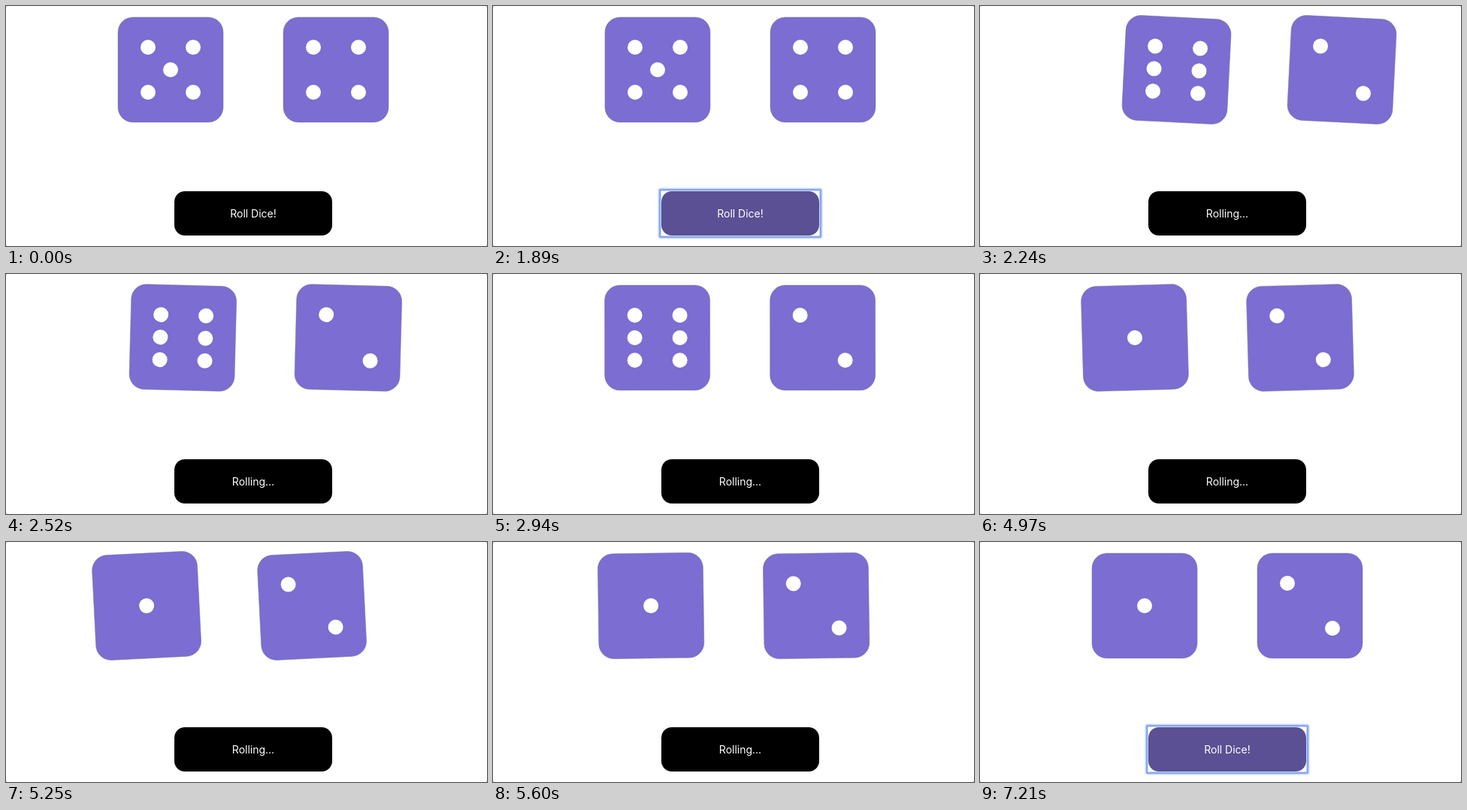
Recreate the animation shown at these times as an HTML page. Size 640 by 320 pixels, loop 7280 ms.

```html
<!DOCTYPE html>
<html lang="en">
<head>
<meta charset="utf-8">
<title>Roll Dice</title>
<style>
  html, body { margin: 0; width: 100%; height: 100%; overflow: hidden; background: #999; }
  svg { display: block; width: 640px; height: 320px; }
  text { font: 14px Inter, sans-serif; fill: #fff; text-anchor: middle; }
  .face { fill: #7b6dd1; stroke: #777099; stroke-width: .5; }
  .ring { fill: none; stroke: #86a8ee; }
</style>
</head>
<body>
<svg viewBox="0 0 640 320">
  <rect width="640" height="320" rx="2" fill="#fff"/>
  <g id="dice"></g>
  <rect id="button" x="224" y="247" width="210" height="59" rx="14"/>
  <g id="focus" class="ring">
    <rect x="221.5" y="244.5" width="215" height="64" rx="1.5" stroke-width="5" opacity=".25"/>
    <rect x="222" y="245" width="214" height="63" rx="1" stroke-width="2.6"/>
  </g>
  <text id="label" x="329" y="282"></text>
</svg>
<script>
const LOOP = 7280, STEP = 70, WOBBLE = 1050;
const CENTERS = [219, 439], CENTER_Y = 85;

// Each roll: pointer enters, button pressed, label changes, wobble starts, label returns.
const ROLLS = [
  { hover: 1120, press: 1890, roll: 1960, start: 1950, done: 3010, values: [6, 2] },
  { hover: 3920, press: 4690, roll: 4760, start: 4772, done: 5880, values: [1, 2] },
  { hover: 6440, press: 7210, roll: Infinity }
];
const FIRST_VALUES = [5, 4];

// Wobble poses at every 15 % of the duration: [shift in px, angle in degrees].
const POSES = [[0, 0], [-55, -5], [44, 3], [-33, -3], [22, 2], [-11, -1], [0, 0]];

const PIPS = {
  1: [[0, 0]],
  2: [[-1, -1], [1, 1]],
  4: [[-1, -1], [1, -1], [-1, 1], [1, 1]],
  5: [[-1, -1], [1, -1], [0, 0], [-1, 1], [1, 1]],
  6: [[-1, -1], [1, -1], [-1, 0], [1, 0], [-1, 1], [1, 1]]
};

const byId = id => document.getElementById(id);
const dice = byId('dice'), button = byId('button'), focusRing = byId('focus'), label = byId('label');

const bezier = (u, a, b) => 3 * u * (1 - u) ** 2 * a + 3 * u * u * (1 - u) * b + u ** 3;

// The CSS "ease" curve, cubic-bezier(.25, .1, .25, 1).
function ease(x) {
  let low = 0, high = 1;
  for (let i = 0; i < 24; i++) {
    const mid = (low + high) / 2;
    if (bezier(mid, .25, .25) < x) low = mid; else high = mid;
  }
  return bezier(low, .1, 1);
}

function wobble(progress) {
  if (progress <= 0 || progress >= 1) return [0, 0];
  const i = Math.min(5, Math.floor(progress / .15));
  const span = i < 5 ? .15 : .25;
  const k = ease((progress - i * .15) / span);
  return POSES[i].map((from, axis) => from + (POSES[i + 1][axis] - from) * k);
}

function die(value, centerX, [shift, angle]) {
  const pips = PIPS[value].map(([x, y]) => `<circle cx="${x * 30}" cy="${y * 30}" r="10" fill="#fff"/>`);
  return `<g transform="translate(${centerX + shift} ${CENTER_Y}) rotate(${angle})">
    <rect class="face" x="-70" y="-70" width="140" height="140" rx="20"/>${pips.join('')}</g>`;
}

function draw(t) {
  const last = ROLLS.filter(r => t >= r.roll).pop();
  const values = last ? last.values : FIRST_VALUES;
  const pose = last ? wobble((t - last.start) / WOBBLE) : [0, 0];
  const rolling = last && t < last.done;
  const hovered = ROLLS.some(r => t >= r.hover && t < r.roll);
  const pressed = ROLLS.some(r => t >= r.press && t < r.roll);

  dice.innerHTML = CENTERS.map((x, i) => die(values[i], x, pose)).join('');
  button.setAttribute('fill', hovered ? '#5a5093' : '#000');
  focusRing.setAttribute('visibility', pressed ? 'visible' : 'hidden');
  label.textContent = rolling ? 'Rolling...' : 'Roll Dice!';
}

const origin = performance.now();
function tick() {
  const t = (performance.now() - origin) % LOOP;
  draw(Math.floor(t / STEP) * STEP);
  requestAnimationFrame(tick);
}
tick();
</script>
</body>
</html>
```
